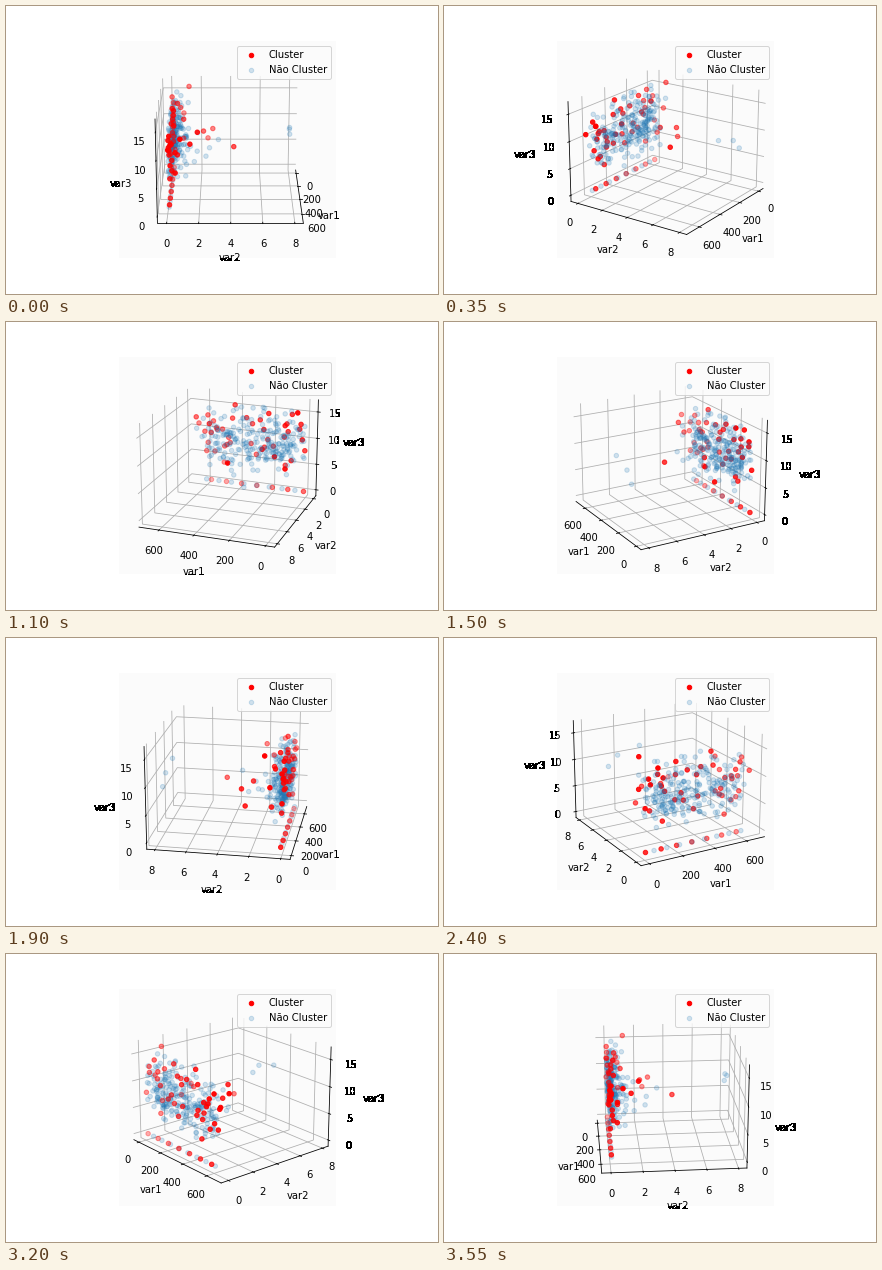
A matplotlib script for the animation above (3600 ms loop, 432 by 288 pixels).

```python
import numpy as np
import matplotlib.pyplot as plt
from matplotlib.animation import FuncAnimation
from mpl_toolkits.mplot3d import Axes3D

FRAMES, INTERVAL = 72, 50
BACKGROUND = "#fbfbfb"


def harden(image, dpi):
    """Make every partly covered pixel opaque."""
    image[..., 3] = image[..., 3] > 0
    return image, 0, 0


class HardEdgeAxes3D(Axes3D):
    """3D axes whose text loses its soft edges outside the axes patch."""

    def draw(self, renderer):
        renderer.start_filter()
        super().draw(renderer)
        renderer.stop_filter(harden)


def cloud(rng, count, skew, spread, height, depth):
    """Points along var1, close to var2 = 0, in a thick band of var3."""
    return np.column_stack([
        640 * rng.beta(*skew, count),
        np.minimum(0.05 + rng.exponential(spread, count), 1.8),
        np.clip(rng.normal(height, depth, count), 3.5, 15.5),
    ])


def floor(count, start, stop):
    """A row of points lying at the bottom."""
    return np.column_stack([
        np.linspace(start, stop, count),
        np.full(count, 0.1),
        np.full(count, 0.1),
    ])


rng = np.random.default_rng(7)
cluster = np.vstack([
    cloud(rng, 38, (0.8, 1.2), 0.35, 10.6, 2.7),
    floor(7, 9, 570),
    [(343, 4.2, 8.1), (113, 2.8, 8.9), (60, 2.46, 6.5), (201, 2.2, 9.4),
     (523, 1.9, 12.8), (25, 1.2, 16), (645, 0.1, 11), (490, 0.1, 3.9)],
])
others = np.vstack([
    cloud(rng, 230, (1.25, 1.5), 0.32, 9, 2.6),
    floor(8, 60, 600),
    [(330, 7.8, 11.2), (195, 7.9, 10), (138, 7.95, 8.1),
     (350, 3.2, 9.5), (400, 2.4, 7), (250, 2.6, 6.8)],
])

fig = plt.figure(figsize=(6, 4), dpi=72, facecolor="white")
fig.subplots_adjust(left=0.125, right=0.9, bottom=0.125, top=0.88)
ax = fig.add_subplot(axes_class=HardEdgeAxes3D)
ax.set_facecolor(BACKGROUND)

ax.scatter(*cluster.T, c="red", label="Cluster")
ax.scatter(*others.T, c="tab:blue", alpha=0.2, label="Não Cluster")

ax.set(xlim=(-48.7, 716.7), ylim=(-0.58, 8.53), zlim=(-1.17, 17.27),
       xlabel="var1", ylabel="var2", zlabel="var3")
ax.set_xticks(range(0, 601, 200))
ax.set_yticks(range(0, 9, 2))
ax.set_zticks(range(0, 16, 5))
for axis in (ax.xaxis, ax.yaxis, ax.zaxis):
    axis.set_pane_color((1, 1, 1, 0))
ax.yaxis.pane.set_edgecolor("#ececec")
ax.legend(loc="upper right", facecolor=BACKGROUND)


def turn(frame):
    ax.view_init(elev=20, azim=frame * 360 / FRAMES)
    return ()


anim = FuncAnimation(fig, turn, frames=FRAMES, interval=INTERVAL,
                     init_func=lambda: turn(0), repeat=True, repeat_delay=0)
plt.show()
```
